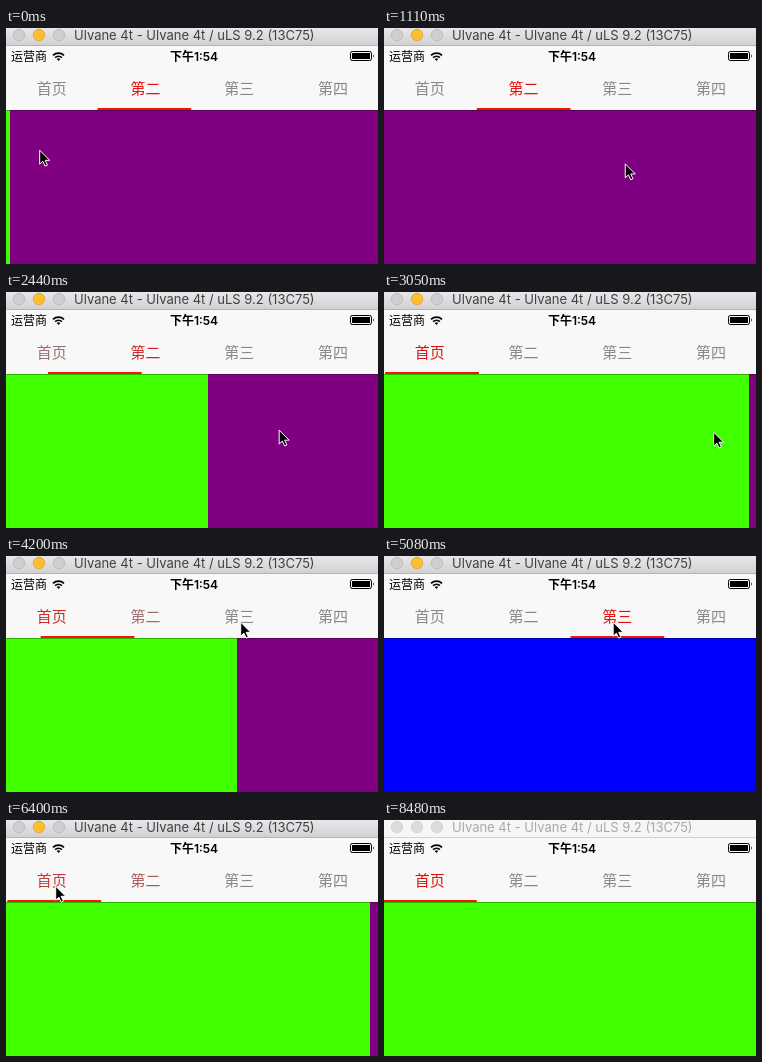
An HTML page for the animation above (8.52 s loop, 372 px wide and 236 px high).

```html
<!DOCTYPE html>
<html lang="zh">
<head>
<meta charset="utf-8">
<style>
  html, body { margin: 0; width: 100%; height: 100%; overflow: hidden; background: #f8f8f8; }
  svg { display: block; }
  text { font-family: "Noto Sans CJK SC", "Noto Sans CJK", sans-serif; }
  #title { font: 13px Inter, "Open Sans", sans-serif; }
</style>
</head>
<body>
<svg width="372" height="236" viewBox="0 0 372 236">
  <defs>
    <linearGradient id="active" x2="0" y2="1">
      <stop stop-color="#e9e7e9"/><stop offset="1" stop-color="#d2d0d2"/>
    </linearGradient>
  </defs>
  <rect width="372" height="236" fill="#f8f8f8"/>

  <g id="pages">
    <rect y="82" width="375" height="154" fill="#40ff00"/>
    <rect x="375" y="82" width="375" height="154" fill="#7f0080"/>
    <rect x="750" y="82" width="375" height="154" fill="#00f"/>
  </g>
  <rect y="82" width="372" height="1" opacity=".3"/>
  <rect id="line" y="80" width="93.75" height="2" fill="#f51505"/>
  <g id="tabs" font-size="15" text-anchor="middle"></g>

  <g font-size="12">
    <text x="5" y="32.5">运营商</text>
    <text x="188" y="32.5" text-anchor="middle" font-weight="500"
      style="font-family: Inter, 'Noto Sans CJK SC', sans-serif; font-weight: 600">下午1:54</text>
  </g>
  <g fill="none" stroke="#000" stroke-width="1.7">
    <path d="M47 27.3a8 8 0 0 1 11 0M49.1 29.6a5 5 0 0 1 6.8 0"/>
    <path d="M52.5 33l-1.8-1.9a2.6 2.6 0 0 1 3.6 0z" fill="#000" stroke="none"/>
    <rect x="344.5" y="23.5" width="21" height="9" rx="1.8" stroke-width="1"/>
    <path d="M346 25h18v6h-18zM367 26.3q1.8 1.7 0 3.4z" fill="#000" stroke="none"/>
  </g>

  <rect id="bar" width="372" height="17"/>
  <rect id="edge" y="17" width="372" height="1"/>
  <g id="lights" stroke-width=".8">
    <circle cx="13" cy="7" r="5.7"/><circle cx="33" cy="7" r="5.7"/><circle cx="53" cy="7" r="5.7"/>
  </g>
  <text id="title" x="68" y="11.7">Ulvane 4t - Ulvane 4t / uLS 9.2 (13C75)</text>

  <path id="cursor" d="M.7 1.2v14l3.2-3 2.2 4.9 2.3-1-2.2-4.8h4.5z" stroke="#fff" stroke-linejoin="round"/>
</svg>
<script>
const LOOP = 8520, PAGE = 375, LEFT = -1;
const $ = id => document.getElementById(id);
const set = (el, attrs) => Object.entries(attrs).forEach(([k, v]) => el.setAttribute(k, v));

const linear = p => p;
const hold = () => 0;
const smooth = p => p * p * (3 - 2 * p);
const out = p => 1 - (1 - p) ** 3;
const inOut = p => p < .5 ? 4 * p ** 3 : 1 - 4 * (1 - p) ** 3;

// Each key: [time, value, easing towards the next key]
const scroll = [
  [0, 370, hold], [150, 375, linear], [1540, 375, linear], [1820, 303, linear],
  [2700, 117, linear], [2790, 108, out], [3260, 0, linear],
  [4010, 0, inOut], [4540, 750, linear], [5950, 750, inOut], [6480, 0, linear]
];
// Label colours trail the scrolling and stand still in the long drag
const tint = [
  [0, 375, linear], [1540, 375, linear], [1820, 303, hold], [2780, 108, out],
  [3260, 0, linear], [4055, 0, inOut], [4540, 750, linear],
  [6080, 750, inOut], [6580, 0, linear]
];
const cursorX = [
  [240, 33, smooth], [760, 289, linear], [940, 289, smooth], [1540, 69, linear],
  [1820, 141, linear], [2700, 327, out], [2960, 329, linear], [3050, 329, smooth],
  [3590, 239, out], [3850, 234, linear], [4990, 234, smooth], [5880, 49, linear],
  [6850, 49, smooth], [7390, 275, linear]
];
const cursorY = [
  [240, 121, smooth], [760, 135, linear], [1820, 134, linear], [2700, 138, linear],
  [2960, 139, linear], [3050, 139, smooth], [3590, 73, out], [3850, 65, linear],
  [6850, 65, smooth], [7390, 240, linear]
];

function at(keys, t) {
  const next = keys.findIndex(k => k[0] > t);
  if (next < 0) return keys[keys.length - 1][1];
  if (next === 0) return keys[0][1];
  const [t0, a, ease] = keys[next - 1], [t1, b] = keys[next];
  return a + (b - a) * ease((t - t0) / (t1 - t0));
}

// The screen refreshes about every 88 ms
const tick = t => t < 150 ? 0 : Math.max(150, 330 + 88 * Math.floor((t - 314) / 88));

const tabs = ['首页', '第二', '第三', '第四'].map((name, i) => {
  const el = document.createElementNS('http://www.w3.org/2000/svg', 'text');
  set(el, { x: LEFT + PAGE / 4 * (i + .5), y: 65.8 });
  el.textContent = name;
  return $('tabs').appendChild(el);
});

function draw(t) {
  const now = tick(t), x = at(scroll, now), pos = at(tint, now) / PAGE;
  set($('pages'), { transform: `translate(${Math.round(LEFT - x)})` });
  set($('line'), { x: LEFT + x / 4 });
  tabs.forEach((el, i) => {
    const s = Math.max(0, 1 - Math.abs(pos - i));
    set(el, { fill: `rgb(${136 + 86 * s},${136 - 116 * s},${136 - 124 * s})` });
  });
  set($('cursor'), { transform: `translate(${at(cursorX, now)} ${at(cursorY, now)})` });

  const focus = t < 8480;
  set($('bar'), { fill: focus ? 'url(#active)' : '#f6f6f6' });
  set($('edge'), { fill: focus ? '#b5b3b5' : '#d3d3d3' });
  set($('title'), { fill: focus ? '#404040' : '#a9a9a9' });
  [...$('lights').children].forEach((el, i) => {
    const lit = focus && i === 1;
    set(el, {
      fill: lit ? '#fdbe2f' : focus ? '#d0ced0' : '#dcdcdc',
      stroke: lit ? '#dea033' : focus ? '#bab8ba' : '#cfcfcf'
    });
  });
}

const start = performance.now();
function frame() {
  draw((performance.now() - start) % LOOP);
  requestAnimationFrame(frame);
}
frame();
</script>
</body>
</html>
```
